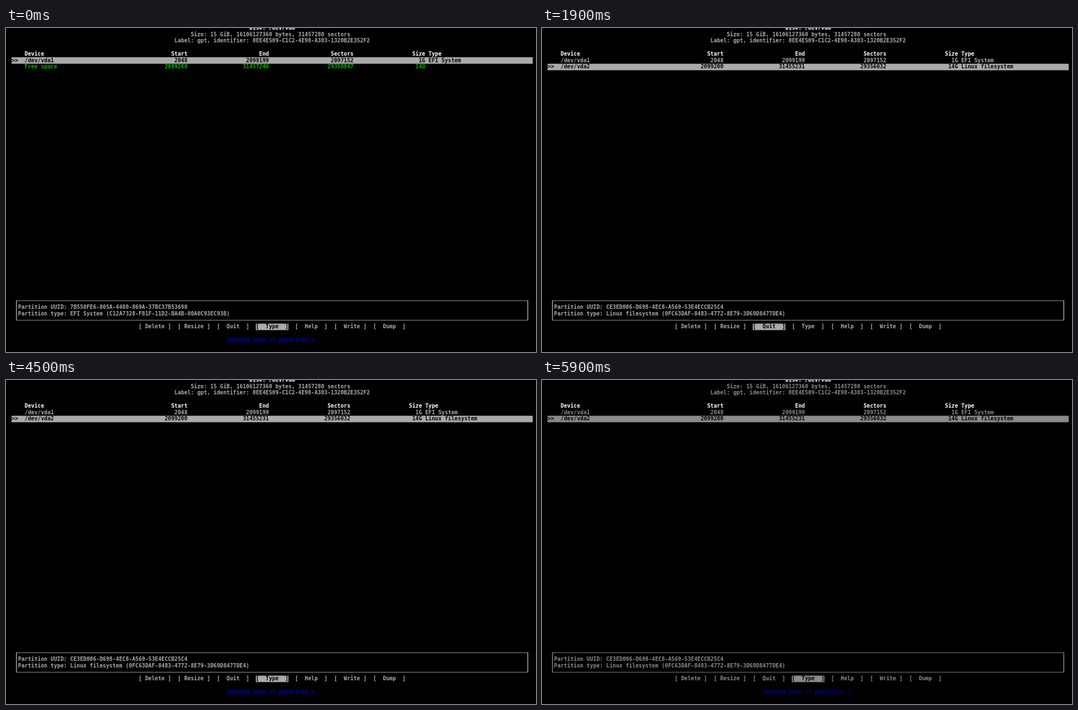
These frames come from a looping animation (956x586 px, 6.7 s). An HTML page with a canvas:

```html
<!DOCTYPE html>
<html lang="en">
<meta charset="utf-8">
<title>Disk partitioning</title>
<style>
  html, body { margin: 0; width: 100%; height: 100%; overflow: hidden; background: #000; }
  canvas { display: block; }
</style>
<canvas id="screen" width="956" height="586"></canvas>
<script>
const ctx = document.getElementById("screen").getContext("2d");
const COLS = 160, CW = 8, CH = 16, SCALE = 0.734375, LOOP = 6700;
const FONT = 'bold 13.29px "DejaVu Sans Mono", monospace';
const WHITE = "#fff", BLACK = "#000", GREEN = "#00b400";
const LINUX_GUID = "0FC63DAF-8483-4772-8E79-3D69D8477DE4";
let gray, blue;

const TYPES = [
  "EFI System", "MBR partition scheme", "Intel Fast Flash", "BIOS boot",
  "Sony boot partition", "Lenovo boot partition", "PowerPC PReP boot",
  "ONIE boot", "ONIE config", "Microsoft reserved", "Microsoft basic data",
  "Microsoft LDM metadata", "Microsoft LDM data", "Windows recovery environment",
  "IBM General Parallel Fs", "Microsoft Storage Spaces", "HP-UX data", "HP-UX service",
  ..."swap,filesystem,server data".split(",").map(s => "Linux " + s),
  ...("x86,x86-64,Alpha,ARC,ARM,ARM-64,IA-64,LoongArch-64,MIPS-32 LE,MIPS-64 LE," +
    "HPPA/PARISC,PPC,PPC64,PPC64LE,RISC-V-32,RISC-V-64,S390,S390X,TILE-Gx")
    .split(",").map(s => `Linux root (${s})`),
  ..."reserved,home,RAID,LVM,variable data,temporary data".split(",").map(s => "Linux " + s)
];

const EFI = ["/dev/vda1", "2048", "2099199", "2097152", "1G", "EFI System"];
const FREE = ["Free space", "2099200", "31457246", "29358047", "14G", ""];
const ROOT = ["/dev/vda2", "2099200", "31455231", "29356032", "14G", "Linux filesystem"];
const EFI_INFO = ["7B550FE6-805A-4480-869A-37BC37B53690",
  "EFI System (C12A7328-F81F-11D2-BA4B-00A0C93EC93B)"];
const ROOT_INFO = ["CE3ED006-D698-4EC8-A569-53E4ECCB25C4", `Linux filesystem (${LINUX_GUID})`];
const PART_MENU = ["Delete", "Resize", " Quit ", " Type ", " Help ", " Write", " Dump "];
const FREE_MENU = ["  New ", " Quit ", " Help ", " Write", " Dump "];

// All drawing uses a 160-column terminal grid with cells of 8 by 16 units.
function rect(x, y, w, h, color) {
  ctx.fillStyle = color;
  ctx.fillRect(x, y, w, h);
}

function text(col, row, str, color = gray) {
  ctx.fillStyle = color;
  [...str].forEach((ch, i) => ctx.fillText(ch, (col + i) * CW, row * CH + 12));
}

const bar = (col, row, n) => rect(col * CW, row * CH, n * CW, CH, gray);
const rightText = (end, row, str, color) => text(end - str.length, row, str, color);
const centerText = (row, str, color) => text((COLS - str.length) >> 1, row, str, color);

function frame(left, top, right, bottom) {
  const x = left * CW + 3, y = top * CH + 7;
  const w = (right - left) * CW, h = (bottom - top) * CH;
  rect(x, y, w + 2, 1.2, gray);
  rect(x, y + h, w + 2, 1.2, gray);
  rect(x, y, 2, h, gray);
  rect(x + w, y, 2, h, gray);
}

function tableRow(row, cells, shift, color) {
  const [device, start, end, sectors, size, type] = cells;
  text(4, row, device, color);
  rightText(54, row, start, color);
  rightText(79, row, end, color);
  rightText(105 - shift, row, sectors, color);
  rightText(127 - shift, row, size, color);
  text(128 - shift, row, type, color);
}

function table(rows, selected, shift) {
  centerText(0, "Disk: /dev/vda", WHITE);
  centerText(1, "Size: 15 GiB, 16106127360 bytes, 31457280 sectors");
  centerText(2, "Label: gpt, identifier: 0EE4E509-C1C2-4E98-A303-1320B2E352F2");
  tableRow(4, ["Device", "Start", "End", "Sectors", "Size", "Type"], shift, WHITE);
  rows.forEach((cells, i) => {
    const active = i === selected;
    if (active) {
      bar(0, 5 + i, COLS);
      text(0, 5 + i, ">>", BLACK);
    }
    tableRow(5 + i, cells, shift, active ? BLACK : cells === FREE ? GREEN : gray);
  });
}

function info([uuid, type]) {
  frame(1, 42, 158, 45);
  text(2, 43, "Partition UUID: " + uuid);
  text(2, 44, "Partition type: " + type);
}

function menu(items, selected) {
  const first = (COLS - items.length * 12 + 2) >> 1;
  items.forEach((name, i) => {
    const col = first + i * 12, active = i === selected;
    if (active) bar(col, 46, 10);
    text(col, 46, `[ ${name} ]`, active ? BLACK : gray);
  });
}

const hint = str => centerText(49, str, WHITE);
const message = str => centerText(48, str, blue);

function rootScreen(selected) {
  table([EFI, ROOT], 1, 1);
  info(ROOT_INFO);
  menu(PART_MENU, selected);
}

function efiScreen() {
  table([EFI, FREE], 0, 0);
  info(EFI_INFO);
  menu(PART_MENU, 3);
  message("Changed type of partition 1.");
}

function freeScreen() {
  table([EFI, FREE], 1, 0);
  menu(FREE_MENU, 0);
  hint("Create new partition from free space");
}

function sizePrompt(t) {
  table([EFI, FREE], 1, 0);
  text(1, 46, "Partition size: 14G");
  const cursorOn = t < 1200 || (t >= 1500 && t < 1700);
  if (cursorOn) rect(20 * CW, 46 * CH + 14, CW, 1.6, gray);
  hint("May be followed by M for MiB, G for GiB, T for TiB, or S for sectors.");
}

function typeList() {
  frame(59, -1, 100, 47);
  text(61, 0, "Select partition type", WHITE);
  TYPES.forEach((name, i) => {
    const active = name === "Linux filesystem";
    if (active) bar(60, i + 1, 40);
    text(61, i + 1, name, active ? BLACK : gray);
  });
  rect(98 * CW, 47 * CH, CW, CH, BLACK);
  text(98, 47, "↓", WHITE);
  hint(LINUX_GUID);
}

function draw(t) {
  const level = t < 5400 ? 170 : t < 5500 ? 140 : 138;
  gray = `rgb(${level},${level},${level})`;
  blue = `rgb(0,0,${level})`;
  ctx.setTransform(1, 0, 0, 1, 0, 0);
  rect(0, 0, 956, 586, BLACK);
  ctx.setTransform(SCALE, 0, 0, SCALE, 10, -5.875);
  ctx.font = FONT;

  if (t < 300) efiScreen();
  else if (t < 1100) freeScreen();
  else if (t < 1900) sizePrompt(t);
  else if (t < 3100) rootScreen(2);
  else if (t < 3600) {
    rootScreen(3);
    hint("Change the partition type");
  } else if (t < 4500) typeList();
  else {
    rootScreen(3);
    message("Changed type of partition 2.");
  }
}

const origin = performance.now();
function tick() {
  draw((performance.now() - origin) % LOOP);
  requestAnimationFrame(tick);
}
tick();
</script>
</html>
```
